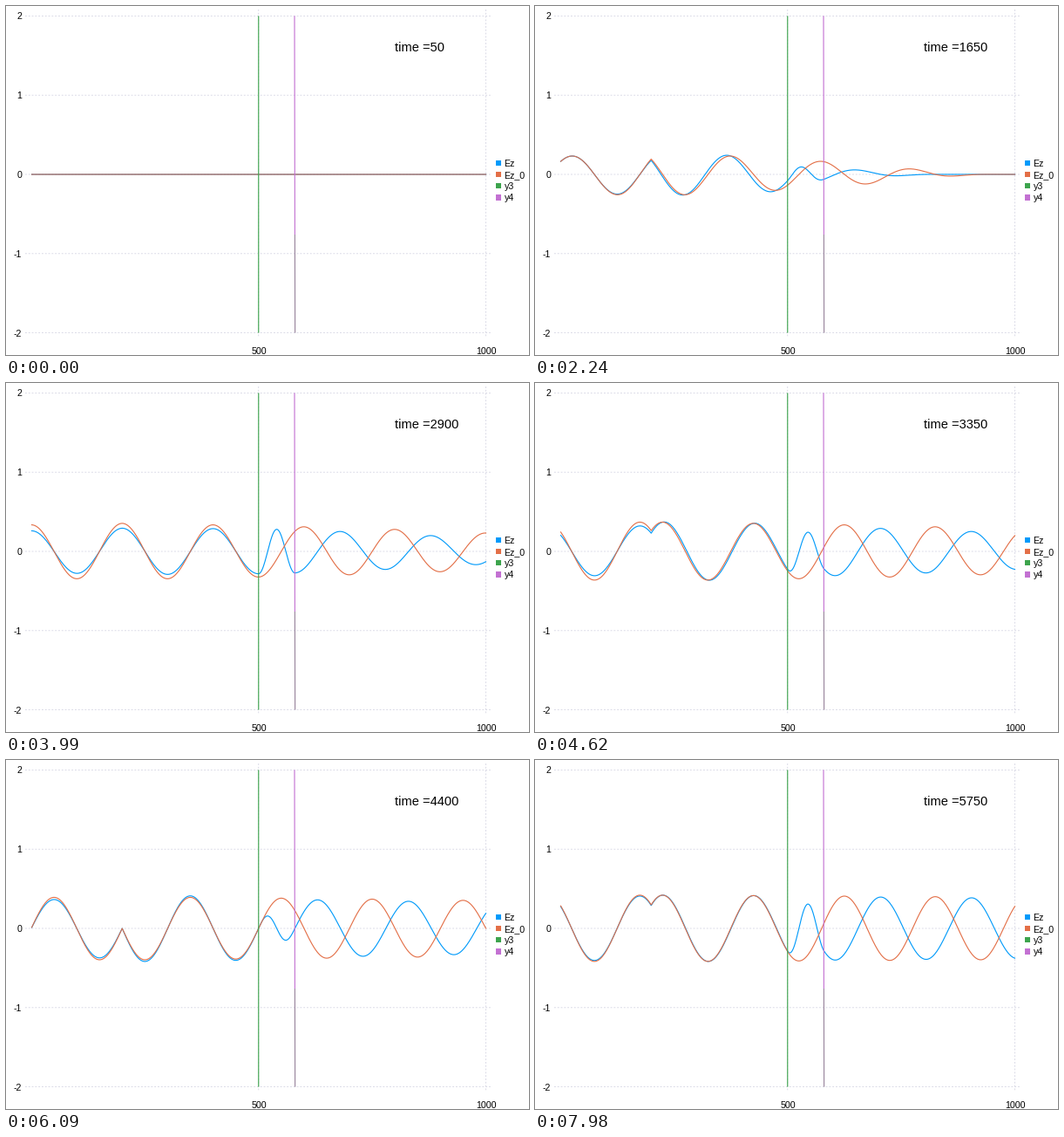
A matplotlib script that plays this animation: 600 px wide and 400 px high, repeating every 8 s.

```python
import numpy as np
import matplotlib.pyplot as plt
from matplotlib.animation import FuncAnimation
from matplotlib.patches import Rectangle

W, H, DPI = 600, 400, 100
PX = 72 / DPI                      # points per pixel
LOOP, TICK, HOLD = 8000, 20, 70    # ms
FRAMES = LOOP // TICK
LAST = (LOOP - 1) // HOLD

BLUE, ORANGE, GREEN, PURPLE = "#009afa", "#e36f47", "#3da44d", "#c371d2"
GREY = "#98849c"

# Wave: speed 1/2 cell per step, wavelength 200 cells, dielectric slab
PERIOD, RAMP = 400, 1000
SOURCE, FRONT, BACK, INDEX = 200, 500, 580, 2.5
X = np.arange(1, 1001)

R_IN = (INDEX - 1) / (INDEX + 1)   # reflection seen from inside the slab
T_IN = 2 / (1 + INDEX)
T_OUT = 2 * INDEX / (1 + INDEX)
CROSS = 2 * INDEX * (BACK - FRONT)  # steps to cross the slab once


def px(x):
    return 29 + 0.5215 * x


def py(v):
    return 193 - 90.8 * v


def pulse(t):
    """Sine that slowly ramps up after t = 0."""
    s = np.maximum(t, 1.0)
    return 0.5 * np.exp(-RAMP / s) * np.sin(2 * np.pi * s / PERIOD) * (t > 0)


def echoes(t):
    """Sum of the pulse and its round trips inside the slab."""
    return sum(R_IN ** (2 * m) * pulse(t - 2 * CROSS * m) for m in range(8))


def free_field(t):
    return pulse(t - 2.0 * abs(X - SOURCE))


def slab_field(t):
    u = t - 2.0 * (FRONT - SOURCE)
    back = u - 2 * (FRONT - X)
    left = (free_field(t) - R_IN * pulse(back)
            + T_IN * T_OUT * R_IN * echoes(back - 2 * CROSS))
    z = 2 * INDEX * (X - FRONT)
    inside = T_IN * (echoes(u - z) + R_IN * echoes(u - 2 * CROSS + z))
    right = T_IN * T_OUT * echoes(u - CROSS - 2 * (X - BACK))
    return np.where(X < FRONT, left, np.where(X <= BACK, inside, right))


fig = plt.figure(figsize=(W / DPI, H / DPI), dpi=DPI, facecolor="white")
ax = fig.add_axes([0, 0, 1, 1])
ax.set_xlim(0, W)
ax.set_ylim(H, 0)
ax.axis("off")


def line(xs, ys, color, width=1.13, **kw):
    return ax.plot(xs, ys, color=color, lw=width * PX, snap=False, **kw)[0]


def label(x, y, s, size=10.67, ha="left"):
    return ax.text(x, y, s, fontsize=size * PX, family="Liberation Sans",
                   color="black", ha=ha, va="baseline")


grid = dict(color="#d0d0e0", width=0.76, linestyle=(0, (2.5, 2.5)),
            dash_capstyle="butt")
for v in range(-2, 3):
    line([22, 557], [py(v)] * 2, **grid)
    label(18.3, py(v) + 4, str(v), ha="right")
for x in (500, 1000):
    line([px(x)] * 2, [4, 380], **grid)
    label(px(x) + 0.2, 399, str(x), ha="center")

blue = line(px(X), py(0 * X), BLUE)
orange = line(px(X), py(0 * X), ORANGE)
line([px(FRONT)] * 2, [py(2), py(-2)], GREEN, solid_capstyle="butt")
line([331.0, 331.4], [py(2), 262], PURPLE, solid_capstyle="butt")
line([331.4, 331.6], [262, py(-2)], GREY, solid_capstyle="butt")

names = ("Ez", "Ez_0", "y3", "y4")
for i, (name, color) in enumerate(zip(names, (BLUE, ORANGE, GREEN, PURPLE))):
    y = 180 + 13.1 * i
    ax.add_patch(Rectangle((561.8, y - 3.3), 6.6, 6.6, fc=color, ec="none"))
    label(571.6, y + 4, name)

clock = label(445.7, 52, "", size=14.67)


def update(i):
    k = min((i * TICK + TICK // 2) // HOLD, LAST)
    t = 50 * (k + 1)
    blue.set_ydata(py(slab_field(t)))
    orange.set_ydata(py(free_field(t)))
    clock.set_text(f"time ={t}")
    return blue, orange, clock


anim = FuncAnimation(fig, update, frames=FRAMES, interval=TICK,
                     repeat=True, repeat_delay=0, blit=False)
plt.show()
```
